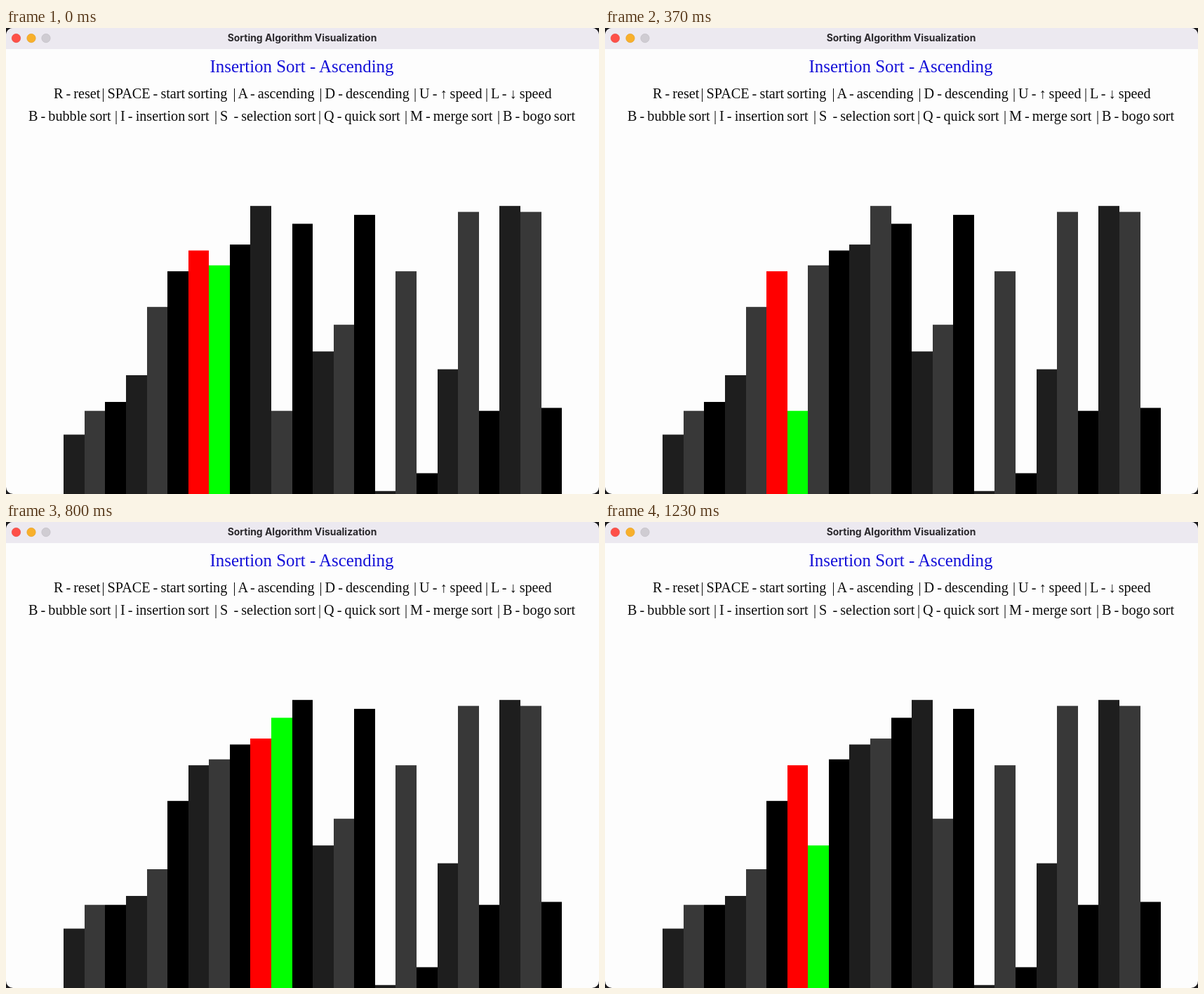
These frames come from a looping animation (845 px wide and 663 px high, 1.26 s). An HTML page:

```html
<!DOCTYPE html>
<html lang="en">
<head>
<meta charset="utf-8">
<title>Sorting Algorithm Visualization</title>
<style>
  html, body { margin: 0; width: 100%; height: 100%; overflow: hidden; background: #1c1b1e; }
  svg { display: block; width: 845px; height: 663px; }
  text { white-space: pre; }
  .bar-title { font: 700 13.95px Inter, sans-serif; fill: #2b292d; text-anchor: middle; }
  .mode { font: 24.9px "Liberation Serif", serif; fill: #1410d8; text-anchor: middle; }
  .keys { font: 20.2px "Liberation Serif", serif; word-spacing: -1px; fill: #0c0c0c; }
</style>
</head>
<body>
<svg viewBox="0 0 845 663">
  <clipPath id="win"><rect width="845" height="663" rx="10"/></clipPath>
  <g clip-path="url(#win)">
    <rect width="845" height="663" fill="#fdfdfd"/>
    <rect width="845" height="30" fill="#ece9f0"/>
    <g stroke-width=".6">
      <circle cx="14.5" cy="14.5" r="6.2" fill="#fe5048" stroke="#e2463f"/>
      <circle cx="36" cy="14.5" r="6.2" fill="#f8b02c" stroke="#dfa02c"/>
      <circle cx="57" cy="14.5" r="6.2" fill="#cfccd2" stroke="#c0bdc3"/>
    </g>
    <text class="bar-title" x="422" y="19">Sorting Algorithm Visualization</text>
    <text class="mode" x="421.5" y="63">Insertion Sort - Ascending</text>
    <g id="keys" class="keys"></g>
    <g id="bars"></g>
  </g>
</svg>
<script>
const LOOP = 1260, FLOOR = 663, UNIT = 4.225;
const GREYS = ['#1e1e1e', '#383838', '#000'];
const values = [20, 28, 31, 40, 63, 75, 82, 77, 84, 97, 28, 91,
                48, 57, 94, 1, 75, 7, 42, 95, 28, 97, 95, 29];
// Start time of each swap shown, in ms
const times = [0, 30, 130, 230, 300, 370, 470, 530, 630, 730, 800, 870, 970, 1070, 1130, 1200];

function add(parent, tag, attrs, text = '') {
  const el = document.createElementNS('http://www.w3.org/2000/svg', tag);
  for (const k in attrs) el.setAttribute(k, attrs[k]);
  el.textContent = text;
  return parent.appendChild(el);
}

const keys = document.getElementById('keys');
const help = [
  [100, [[68, 'R - reset'], [136.5, '| SPACE - start sorting'], [323.5, '| A - ascending'],
         [446.5, '| D - descending'], [581, '| U - ↑ speed'], [683, '| L - ↓ speed']]],
  [132, [[32, 'B - bubble sort'], [155, '| I - insertion sort'], [297, '| S  - selection sort'],
         [445, '| Q - quick sort'], [568, '| M - merge sort'], [700, '| B - bogo sort']]]
];
for (const [y, parts] of help)
  for (const [x, label] of parts) add(keys, 'text', { x, y }, label);

// One state per swap of an insertion sort; pos is the bar being inserted
function sortStates(list, from, count) {
  const a = [...list], out = [{ list: [...a], pos: from }];
  for (let i = from; i < a.length && out.length < count; i++) {
    for (let j = i; j > 0 && a[j - 1] > a[j]; j--) {
      [a[j - 1], a[j]] = [a[j], a[j - 1]];
      out.push({ list: [...a], pos: j - 1 });
    }
  }
  return out.slice(0, count);
}
const states = sortStates(values, 7, times.length);

const edge = i => Math.round(82.2 + 29.58 * i);
const group = document.getElementById('bars');
const bars = values.map((_, i) => add(group, 'rect', { x: edge(i), width: edge(i + 1) - edge(i) }));

let shown = -1;
function draw(n) {
  if (n === shown) return;
  shown = n;
  const { list, pos } = states[n];
  bars.forEach((bar, i) => {
    const height = list[i] * UNIT;
    bar.setAttribute('y', FLOOR - height);
    bar.setAttribute('height', height);
    bar.setAttribute('fill', i === pos ? '#0f0' : i === pos - 1 ? '#f00' : GREYS[i % 3]);
  });
}

let start;
function tick(now) {
  start ??= now;
  const t = (now - start) % LOOP;
  draw(times.findLastIndex(s => s <= t + 0.5));
  requestAnimationFrame(tick);
}
draw(0);
requestAnimationFrame(tick);
</script>
</body>
</html>
```
